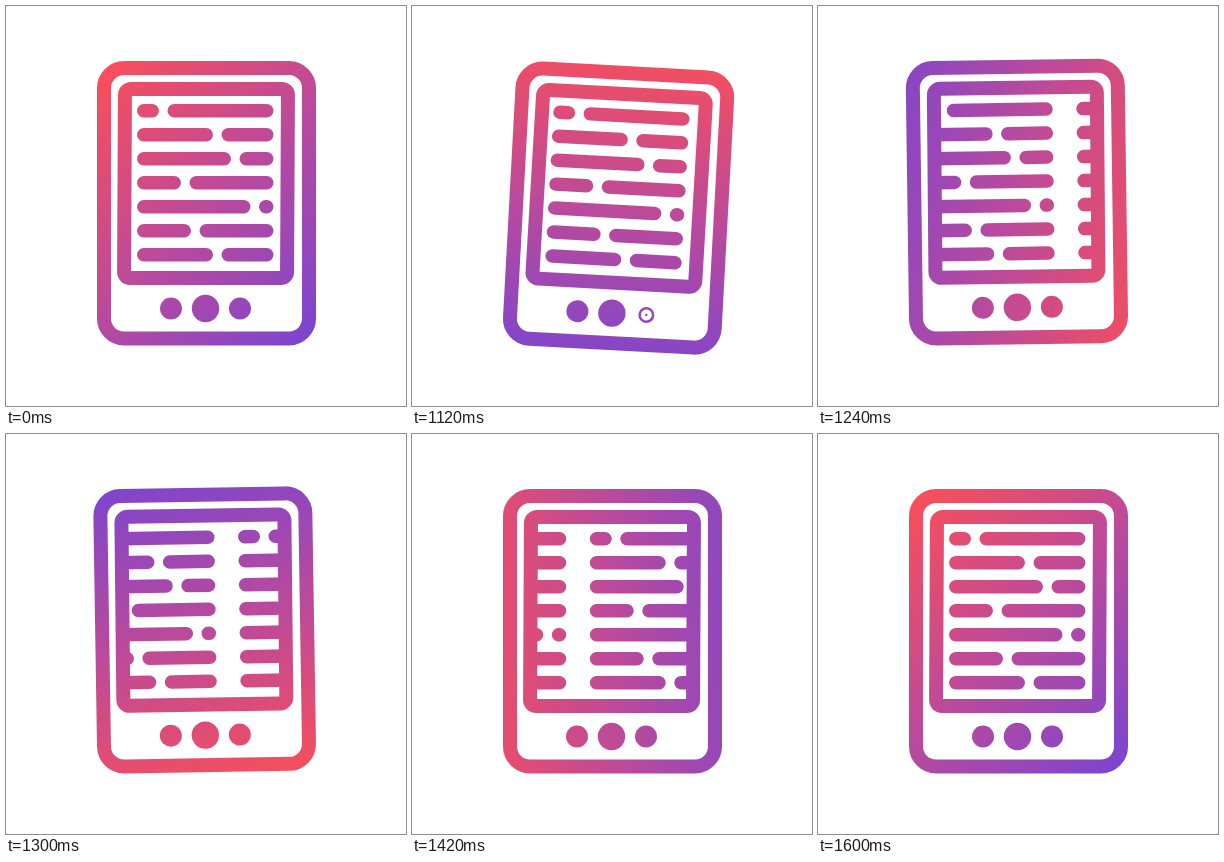
Write an HTML page with a canvas that moves like this. It is 400 px wide and 400 px high and loops after 1690 ms.

```html
<!DOCTYPE html>
<html lang="en">
<head>
<meta charset="utf-8">
<title>E-reader page turn</title>
<style>
  html, body { margin: 0; height: 100%; overflow: hidden; background: #fff; }
  canvas { display: block; }
</style>
</head>
<body>
<canvas id="stage" width="400" height="400"></canvas>
<script>
const ctx = document.getElementById('stage').getContext('2d');
const LOOP = 1690, REST = 1030, STEP = 30, LAST = 19;
const PAGE = 160;                                   // distance between two pages
const GAPS = [153, 207, 225, 175, 244.5, 185, 207];  // end of the first word per row
const PIVOT = [114, 312];

const clamp = v => Math.min(1, Math.max(0, v));
const ease = u => (1 - Math.cos(Math.PI * clamp(u))) / 2;

// Eased interpolation through [step, value] keys
function track(keys, s) {
  let value = keys[0][1];
  for (let i = 1; i < keys.length; i++) {
    const [s0, v0] = keys[i - 1], [s1, v1] = keys[i];
    if (s > s0) value = v0 + (v1 - v0) * ease((s - s0) / (s1 - s0));
  }
  return value;
}

const tiltAt = s => track([[-1.3, 0], [3, 3.1], [8, -1.2], [11, 0]], s) * Math.PI / 180;
const pressAt = s => track([[-1.3, 0], [3, 1], [7, 0]], s);
const scrollAt = s => PAGE * track([[2.15, 0], [19.2, 1]], s);

function gradientAt(s) {
  const u = clamp((s + 1.3) / 18.6);
  const turn = u - 0.6 * Math.sin(2 * Math.PI * u) / (2 * Math.PI);
  const angle = Math.PI / 4 + 2 * Math.PI * turn;
  const x = 172 * Math.cos(angle), y = 172 * Math.sin(angle);
  const g = ctx.createLinearGradient(200 - x, 198 - y, 200 + x, 198 + y);
  g.addColorStop(0, '#fa4f58');
  g.addColorStop(0.5, '#bc4a9a');
  g.addColorStop(1, '#7a45d0');
  return g;
}

function disc(x, y, r) {
  ctx.beginPath();
  ctx.arc(x, y, r, 0, 2 * Math.PI);
  ctx.fill();
}

function drawText(scroll) {
  ctx.save();
  ctx.beginPath();
  ctx.rect(118, 83, 164, 189);
  ctx.clip();
  ctx.lineWidth = 13.5;
  ctx.lineCap = 'round';
  ctx.beginPath();
  const bar = (x0, x1, y) => {
    ctx.moveTo(x0 + 6.75, y);
    ctx.lineTo(Math.max(x1 - 6.75, x0 + 6.8), y);
  };
  for (const x of [-scroll, PAGE - scroll]) {
    GAPS.forEach((end, row) => {
      const y = 104.7 + 24 * row;
      bar(131 + x, end + x, y);
      bar(end + 8.5 + x, 267.5 + x, y);
    });
  }
  ctx.stroke();
  ctx.restore();
}

function drawScreenFrame() {
  ctx.save();
  ctx.transform(1, 0, -0.005, 1, 0.89, 0);
  ctx.beginPath();
  ctx.roundRect(111.5, 76, 177, 203, 13);
  ctx.rect(125.5, 90, 149, 175);
  ctx.fill('evenodd');
  ctx.restore();
}

function drawButtons(press, paint) {
  const y = 302.5;
  disc(165, y, 11);
  disc(199.5, y, 13.7);
  disc(234, y, 11 - 3 * press);
  const hole = 5.5 * clamp(3 * press - 2);
  if (hole) {
    ctx.fillStyle = '#fff';
    disc(234, y, hole);
    ctx.fillStyle = paint;
    disc(234, y, 1.2);
  }
}

function draw(s) {
  const paint = gradientAt(s);
  ctx.fillStyle = '#fff';
  ctx.fillRect(0, 0, 400, 400);
  ctx.fillStyle = ctx.strokeStyle = paint;
  ctx.save();
  ctx.translate(...PIVOT);
  ctx.rotate(tiltAt(s));
  ctx.translate(-PIVOT[0], -PIVOT[1]);

  ctx.lineWidth = 14;
  ctx.beginPath();
  ctx.roundRect(98, 62, 205, 270.5, 20);
  ctx.stroke();

  drawText(scrollAt(s));
  drawScreenFrame();
  drawButtons(pressAt(s), paint);
  ctx.restore();
}

const start = performance.now();
function tick() {
  const t = (performance.now() - start) % LOOP;
  const step = Math.floor((t - REST) / STEP);
  draw(step < 0 || step >= LAST ? -2 : step);
  requestAnimationFrame(tick);
}
tick();
</script>
</body>
</html>
```
